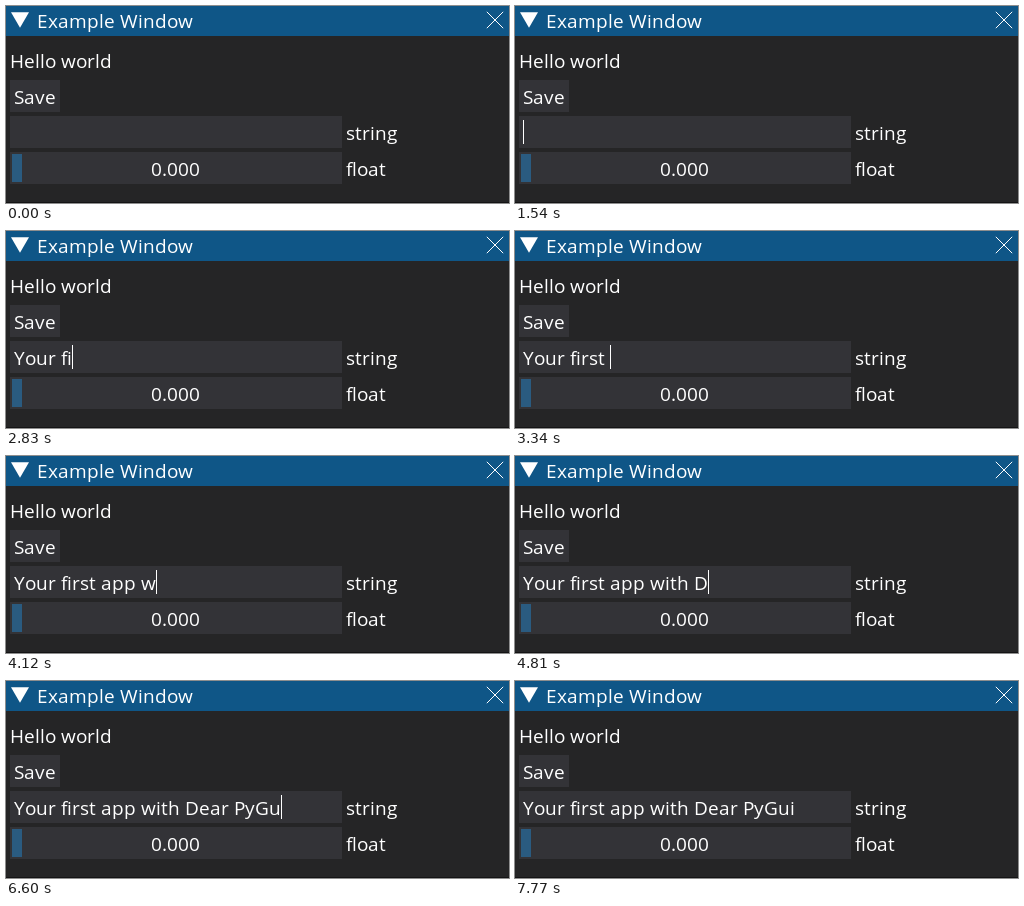
Animation, 503 px wide and 197 px high, one loop 8000 ms. Source, as an HTML page:

```html
<!DOCTYPE html>
<html lang="en">
<head>
<meta charset="utf-8">
<title>Example Window</title>
<style>
  html, body { margin: 0; width: 100%; height: 100%; overflow: hidden; background: #252526; }
  svg { display: block; }
  text {
    font: 19px "Open Sans", "Noto Sans", sans-serif;
    font-kerning: none;
    font-variant-ligatures: none;
    fill: #fff;
  }
  .frame { fill: #333337; }
  rect { shape-rendering: crispEdges; }
</style>
</head>
<body>
<svg width="503" height="197" viewBox="0 0 503 197">
  <rect width="503" height="197" fill="#252526"/>
  <rect y="196" width="503" height="1" fill="#141415"/>
  <rect width="503" height="30" fill="#0f5687"/>
  <path d="M14 21.8 L5 6.2 H23 Z" fill="#fff"/>
  <path d="M480.8 5.8 L497.2 22.2 M497.2 5.8 L480.8 22.2" stroke="#fff"/>
  <rect class="frame" x="4" y="74" width="50" height="32"/>
  <rect class="frame" x="4" y="110" width="332" height="32"/>
  <rect class="frame" x="4" y="146" width="332" height="32"/>
  <rect x="6" y="148" width="10" height="28" fill="#2a5b80"/>
  <text data-x="31" y="22">Example Window</text>
  <text data-x="4" y="62">Hello world</text>
  <text data-x="8" y="98">Save</text>
  <text data-x="340" y="134">string</text>
  <text data-x="145" y="170">0.000</text>
  <text data-x="340" y="170">float</text>
  <text id="input" y="134"></text>
  <rect id="caret" y="114" width="1" height="24" fill="#fff"/>
</svg>
<script>
  const LOOP = 8000;
  const INPUT_X = 8;
  const PHRASE = "Your first app with Dear PyGui";
  // Time of each keystroke
  const KEYS = [
    1880, 2140, 2240, 2340, 2500,
    2700, 2830, 2990, 3090, 3180, 3340,
    3510, 3580, 3770, 3820,
    4120, 4250, 4350, 4450, 4550,
    4810, 5010, 5090, 5180, 5260,
    5590, 5790, 6170, 6600, 6670
  ];
  const CARET_ON = [[330, 1150], [1540, 7770]];

  const pen = document.createElement("canvas").getContext("2d");
  pen.font = '19px "Open Sans", "Noto Sans", sans-serif';

  // Glyphs sit on whole pixels; the last entry is the end of the text
  function glyphStops(str, x) {
    const stops = [x];
    for (const ch of str) stops.push(x += Math.round(pen.measureText(ch).width));
    return stops;
  }

  for (const label of document.querySelectorAll("text[data-x]")) {
    const stops = glyphStops(label.textContent, +label.dataset.x);
    label.setAttribute("x", stops.slice(0, -1).join(" "));
  }

  const input = document.getElementById("input");
  const caret = document.getElementById("caret");
  const stops = glyphStops(PHRASE, INPUT_X);
  input.setAttribute("x", stops.slice(0, -1).join(" "));

  let shown = -1;
  function draw(t) {
    const count = KEYS.filter(key => key <= t).length;
    if (count !== shown) {
      input.textContent = PHRASE.slice(0, count);
      caret.setAttribute("x", stops[count]);
      shown = count;
    }
    const on = CARET_ON.some(([from, to]) => t >= from && t < to);
    caret.setAttribute("visibility", on ? "visible" : "hidden");
  }

  const start = performance.now();
  function tick() {
    draw((performance.now() - start) % LOOP);
    requestAnimationFrame(tick);
  }
  tick();
</script>
</body>
</html>
```
